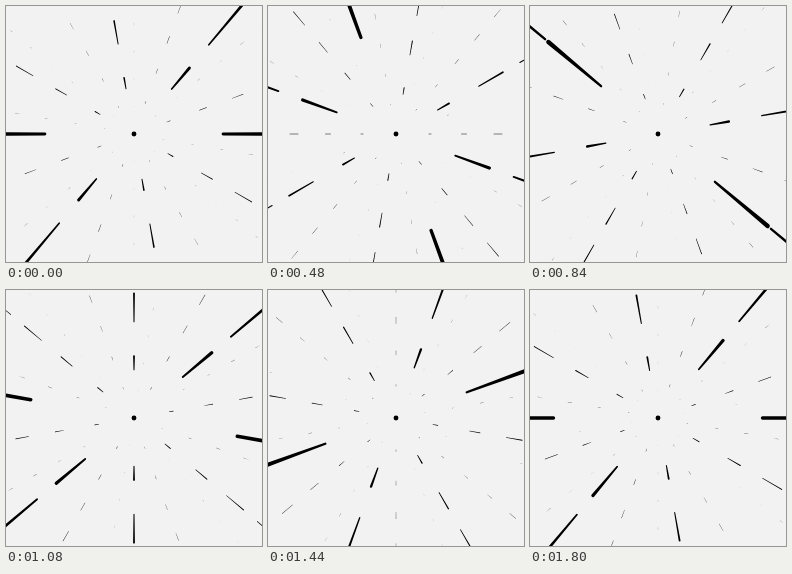
These frames come from a looping animation (256 by 256 pixels, 1840 ms). An HTML page with a canvas:

```html
<!DOCTYPE html>
<html lang="en">
<head>
<meta charset="utf-8">
<title>Tunnel of dashes</title>
<style>
html, body { margin: 0; width: 100%; height: 100%; overflow: hidden; background: #f2f2f2; }
canvas { display: block; width: 100vw; height: 100vh; }
</style>
</head>
<body>
<canvas id="stage" width="256" height="256"></canvas>
<script>
const ctx = document.getElementById('stage').getContext('2d');
const LOOP = 1840, STEP = 40, SPOKES = 18, LAG = 10, START = 14.7;
const HALF = Math.PI / 2, RAD = Math.PI / 180;

// Distance from the centre and line weight, both shrinking with age.
const reach = age => 24.4 / (1 - Math.exp(-0.0222 * Math.max(age, 4)));
const weight = age => 7.2 * Math.exp(-age / 14) + 0.42 * (1 - age / 125);

// The turn runs evenly and slows slightly just before the loop closes.
const turnAt = t => Math.min(0.0995 * t, 180 - 0.0625 * (LOOP - t));

// A tapered dash with round ends that lie inside its length.
function dash(inner, outer, thin, thick) {
  ctx.beginPath();
  ctx.arc(inner + thin, 0, thin, HALF, 3 * HALF);
  ctx.arc(outer - thick, 0, thick, -HALF, HALF);
  ctx.closePath();
  ctx.fill();
}

function spoke(angle, age) {
  const inner = reach(age), outer = reach(age - LAG);
  const thin = weight(age) / 2, thick = weight(Math.max(age - LAG, 4)) / 2;
  for (const flip of [0, 180]) {
    ctx.save();
    ctx.rotate((flip - angle) * RAD);
    for (let n = 1; n * inner < 185; n++) dash(n * inner, n * outer, thin, thick);
    ctx.restore();
  }
}

function render(time) {
  const t = Math.floor((time % LOOP) / STEP) * STEP;
  ctx.setTransform(1, 0, 0, 1, 0, 0);
  ctx.fillStyle = '#f2f2f2';
  ctx.fillRect(0, 0, 256, 256);
  ctx.translate(128, 128);
  ctx.fillStyle = '#000';
  for (let k = 0; k < SPOKES; k++) {
    const age = (START + turnAt(t) - LAG * k + 360) % 180;
    if (age > 4 && age < 124) spoke(-50 * k, age);
  }
  ctx.beginPath();
  ctx.arc(0, 0, 2.45, 0, 2 * Math.PI);
  ctx.fill();
}

const begin = performance.now();
function tick() {
  render(performance.now() - begin);
  requestAnimationFrame(tick);
}
tick();
</script>
</body>
</html>
```
